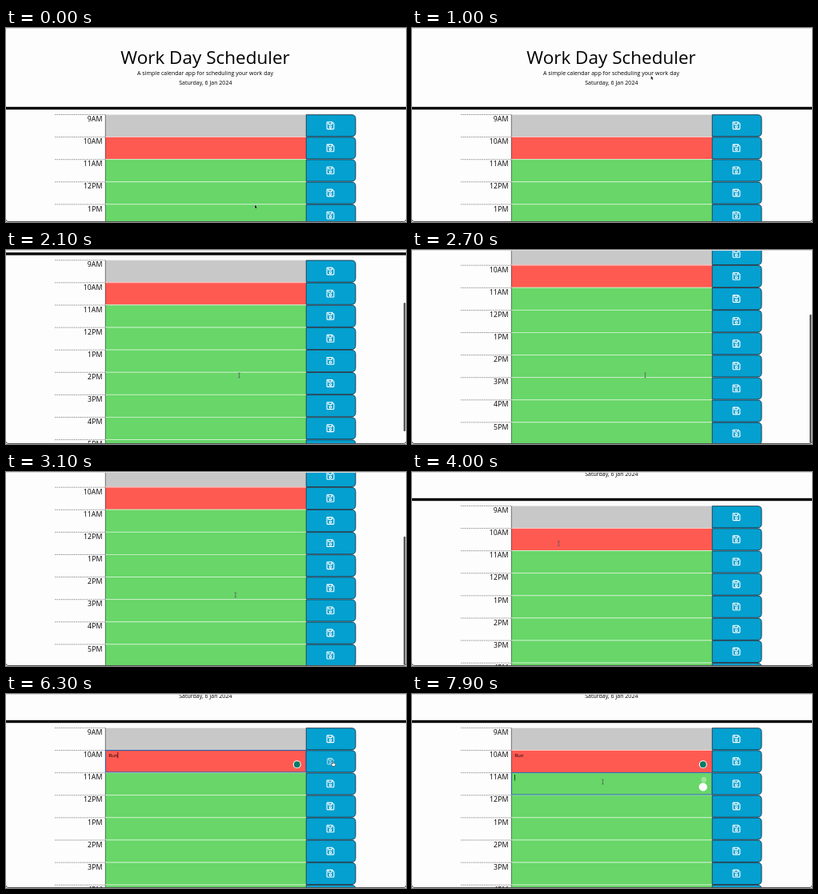
Write an HTML page that moves like this. It is 500 px wide and 243 px high and loops after 8000 ms.

```html
<!DOCTYPE html>
<html lang="en">
<head>
<meta charset="utf-8">
<title>Work Day Scheduler</title>
<style>
  html, body { margin: 0; width: 100%; height: 100%; overflow: hidden; background: #fdfdfd; }
  svg { display: block; width: 100vw; height: 100vh; font-family: "Open Sans", sans-serif; }
  .middle { text-anchor: middle; }
  .hour { text-anchor: end; font-size: 8.8px; }
  .note { font-size: 6.1px; }
</style>
</head>
<body>
<svg viewBox="0 0 500 243">
  <defs>
    <g id="disk" fill="none" stroke="#fff" stroke-width="1.1" stroke-linejoin="round">
      <path d="M-3.6-4.4H2.2L4.4-2.2V3.6Q4.4 4.4 3.6 4.4H-3.6Q-4.4 4.4-4.4 3.6V-3.6Q-4.4-4.4-3.6-4.4Z"/>
      <path d="M-2.5-4.2V-1.6H1.8V-4.2"/>
      <circle cy="1.6" r="1.3"/>
    </g>
  </defs>

  <g id="page">
    <text class="middle" x="249" y="45" font-size="22.5">Work Day Scheduler</text>
    <text class="middle" x="249" y="58.6" font-size="7.06">A simple calendar app for scheduling your work day</text>
    <text class="middle" x="249.3" y="71.2" font-size="7.06">Saturday, 6 Jan 2024</text>
    <rect y="98.8" width="500" height="3.4"/>
    <g id="rows"></g>
    <rect id="focus" x="124.5" width="250.5" height="27.4" fill="none" stroke="#2460b4"/>
    <text id="note" class="note" x="128.3" y="145.3"></text>
    <rect id="caret" width=".7" height="7.4"/>
    <circle id="helper1" cx="363.8" cy="154.3" r="4.5" stroke="#fff" stroke-width="1.1"/>
    <g id="helper2" fill="#fff">
      <circle cx="364.8" cy="173.4" r="3.3" opacity=".35"/>
      <circle cx="363.8" cy="182.4" r="5.2"/>
    </g>
  </g>

  <rect id="thumb" x="497" width="2.4" height="161" rx="1.2" fill="#555"/>
  <rect width="500" height="1" fill="#dedede"/>
  <path d="M0 240Q0 242.5 3 242.5H497Q500 242.5 500 240" fill="none" stroke="#555"/>

  <g id="cursor">
    <path id="arrow" d="M0 0V4.6L1.1 3.7 1.9 5.3 2.7 4.9 1.9 3.3H3.2Z" stroke="#fff" stroke-width=".3"/>
    <path id="beam" d="M-1.3-3Q0-3 0-2.2Q0-3 1.3-3M0-2.2V2.2M-1.3 3Q0 3 0 2.2Q0 3 1.3 3" fill="none" stroke="#555" stroke-width=".7"/>
    <path id="hand" d="M-.8-3Q0-3.6.5-2.8V-.8L2.4-.3Q3-.1 2.8 1L2.2 3H-.9L-2.6.6Q-2-.3-.8.5Z" fill="#fff" stroke="#222" stroke-width=".5"/>
  </g>
</svg>
<script>
const LOOP = 8000, STEP = 100;
const ROW_TOP = 108, ROW_HEIGHT = 28.1, MAX_SCROLL = 117.4;
const HOURS = ["9AM", "10AM", "11AM", "12PM", "1PM", "2PM", "3PM", "4PM", "5PM"];
const COLORS = ["#c8c8c8", "#ff5a52"], FUTURE = "#68d668";
const FOCUS_FIRST = 4400, SAVE = 6600, FOCUS_SECOND = 7500;
const KEYS = [4900, 5100, 5300];

// Each stop is [time, value, ...].
const SCROLL = [[1900, 0], [2000, 45], [2100, 95.7], [2200, 109], [2300, 115], [2400, MAX_SCROLL],
  [3100, MAX_SCROLL], [3200, 104], [3300, 84], [3400, 72], [3500, 67], [3600, 66]];
const POINTER = [[0, 311, 221.5], [100, 300, 190], [200, 291, 160], [300, 291, 160], [700, 300, 42],
  [900, 300, 42], [1300, 291.5, 157], [3000, 291.5, 157], [3800, 183.5, 89.5], [5400, 183.5, 89.5],
  [6100, 409, 87.5], [6700, 409, 87.5], [7300, 238.5, 110], [8000, 238.5, 110]];

const el = id => document.getElementById(id);
const rowY = i => ROW_TOP + i * ROW_HEIGHT;
const show = (id, visible) => el(id).setAttribute("visibility", visible ? "visible" : "hidden");

function sample(stops, t, ease = u => u) {
  if (t <= stops[0][0]) return stops[0].slice(1);
  const i = stops.findIndex(s => s[0] > t);
  if (i < 0) return stops[stops.length - 1].slice(1);
  const [t0, ...from] = stops[i - 1], [t1, ...to] = stops[i];
  const u = ease((t - t0) / (t1 - t0));
  return from.map((v, k) => v + (to[k] - v) * u);
}
const smooth = u => u * u * (3 - 2 * u);

el("rows").innerHTML = HOURS.map((hour, i) => `
  <g transform="translate(0 ${rowY(i)})">
    <path d="M61 .5H124" stroke="#777" stroke-width=".8" stroke-dasharray="1 .6"/>
    <text class="hour" x="120.4" y="9.2">${hour}</text>
    <rect x="124" width="251" height="28.2" fill="${COLORS[i] || FUTURE}"/>
    <path d="M124 .4H375" stroke="#fff" stroke-width=".8" opacity=".8"/>
    <path d="M124.3 .5V28.1" stroke="#333" stroke-width=".6"/>
    <path d="M375.3.7H432Q437 .7 437 5.7V22.9Q437 27.9 432 27.9H375.3Z" fill="#03a0d0" stroke="#123" stroke-width=".8"/>
    <use id="save${i}" href="#disk" transform="translate(405.5 14.2)"/>
  </g>`).join("");

function drawPointer(t, scroll) {
  const [x, y] = sample(POINTER, t, smooth);
  const inRows = y + scroll > ROW_TOP;
  const overButton = inRows && x > 375 && x < 437;
  const overNote = inRows && x > 124 && x <= 375 && t >= 100;
  el("cursor").setAttribute("transform", `translate(${x} ${y})`);
  show("hand", overButton);
  show("beam", overNote);
  show("arrow", !overButton && !overNote);
  el("save1").setAttribute("transform", `translate(405.5 14.2) scale(${overButton ? .85 : 1})`);
  el("save1").setAttribute("opacity", overButton ? .8 : 1);
}

function drawNotes(t) {
  const first = t >= FOCUS_FIRST && t < SAVE, second = t >= FOCUS_SECOND;
  const typed = KEYS.filter(key => key <= t).length;
  const lastInput = second ? FOCUS_SECOND : Math.max(FOCUS_FIRST, ...KEYS.filter(key => key <= t));
  const row = second ? 2 : 1;

  el("note").textContent = "Run".slice(0, typed);
  show("focus", first || second);
  el("focus").setAttribute("y", rowY(row) + .4);
  show("caret", (first || second) && Math.floor((t - lastInput) / 500) % 2 === 0);
  el("caret").setAttribute("x", second ? 128.3 : 128.3 + [0, 3.8, 7.5, 11.2][typed]);
  el("caret").setAttribute("y", rowY(row) + 2.8);
  show("helper1", t >= FOCUS_FIRST + 100);
  el("helper1").setAttribute("fill", typed ? "#087a68" : "#fff");
  show("helper2", t >= FOCUS_SECOND + 100);
}

function draw(now) {
  const t = Math.floor(now % LOOP / STEP) * STEP;
  const [scroll] = sample(SCROLL, t);
  el("page").setAttribute("transform", `translate(0 ${-scroll})`);
  el("thumb").setAttribute("y", 1.5 + scroll * .675);
  el("thumb").setAttribute("opacity", t < 1900 ? 0 : sample([[3700, 1], [4000, 0]], t)[0]);
  drawNotes(t);
  drawPointer(t, scroll);
}

const start = performance.now();
function tick() {
  draw(performance.now() - start);
  requestAnimationFrame(tick);
}
tick();
</script>
</body>
</html>
```
